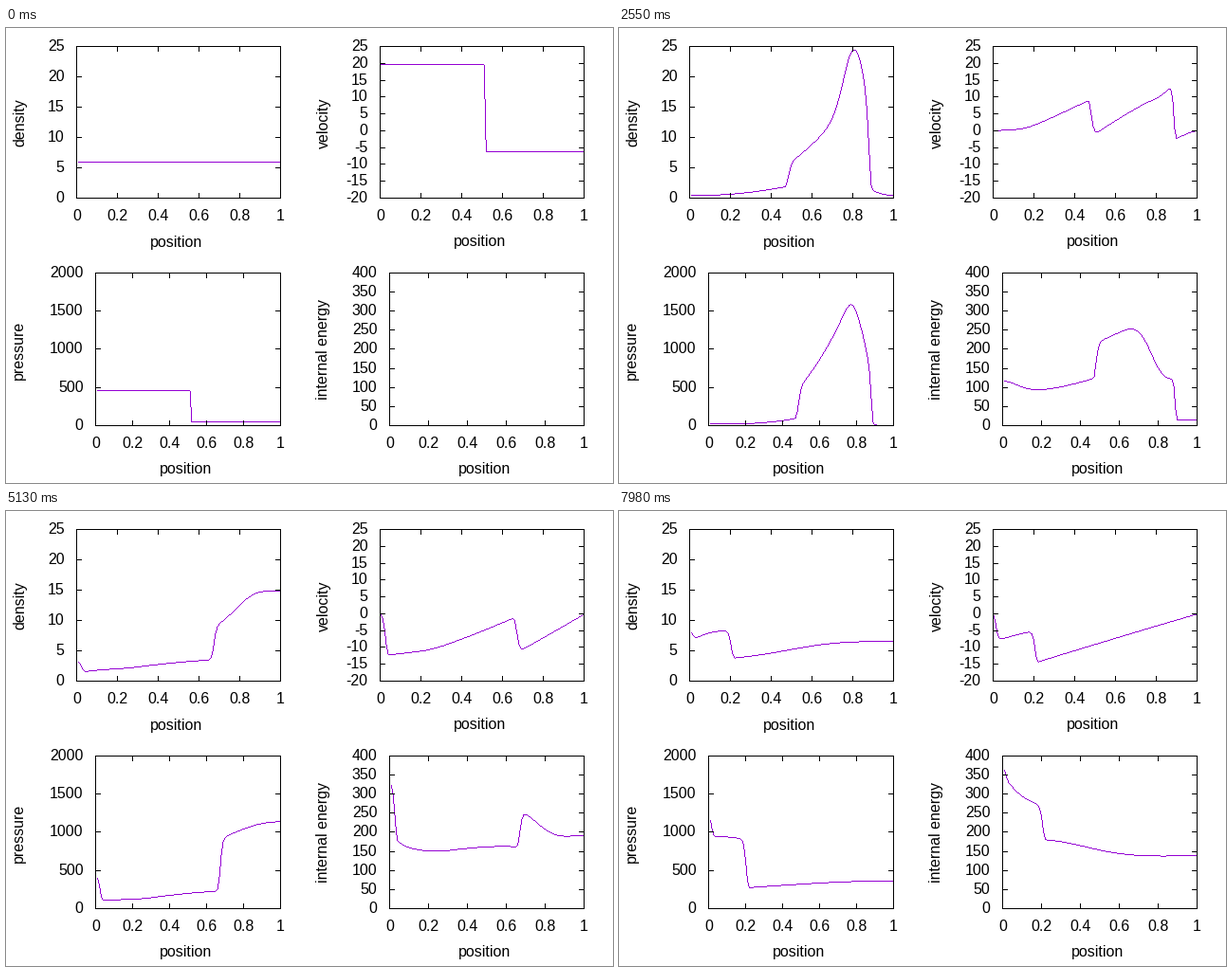
Write a matplotlib script that moves like this. It is 640x480 px and loops after 8 s.

```python
import numpy as np
import matplotlib.pyplot as plt
from matplotlib.animation import FuncAnimation
from matplotlib.collections import LineCollection
from matplotlib.patches import Rectangle

W, H = 640, 480
PX = 0.72                 # one pixel in points at 100 dpi
LOOP, TICK = 8000, 25     # ms
HOLD = 30                 # ms each state stays on screen
STATES = 267

# Gas dynamics: colliding streams between two solid walls
N = 100
DX = 1 / N
GAMMA = 1.4
CFL = 0.9
MIRROR = np.array([[1], [-1], [1]])


def primitive(cons):
    rho, mom, energy = cons
    u = mom / rho
    p = np.maximum((GAMMA - 1) * (energy - mom * u / 2), 1e-6)
    return rho, u, p


def advance(cons):
    """One first-order HLL step with reflecting ends."""
    full = np.hstack((cons[:, :1] * MIRROR, cons, cons[:, -1:] * MIRROR))
    rho, u, p = primitive(full)
    c = np.sqrt(GAMMA * p / rho)
    f = np.array([rho * u, rho * u * u + p, (full[2] + p) * u])
    slow, fast = u - c, u + c
    lo = np.minimum(np.minimum(slow[:-1], slow[1:]), 0)
    hi = np.maximum(np.maximum(fast[:-1], fast[1:]), 0)
    flux = (hi * f[:, :-1] - lo * f[:, 1:] + lo * hi * np.diff(full)) / (hi - lo)
    dt = CFL * DX / np.max(abs(u) + c)
    return cons - dt / DX * np.diff(flux)


def simulate():
    left = np.arange(1, N + 1) <= 51
    rho = np.where(left, 5.99924, 5.99242)
    u = np.where(left, 19.5975, -6.19633)
    p = np.where(left, 460.894, 46.095)
    cons = np.array([rho, rho * u, p / (GAMMA - 1) + rho * u * u / 2])
    states = [(rho, np.append(u[0], u), p, np.zeros(N))]
    for _ in range(STATES - 1):
        cons = advance(cons)
        rho, u, p = primitive(cons)
        states.append((rho, np.append(0, u), p, p / rho / (GAMMA - 1)))
    return states


# Name, left, right, top, bottom, low, high, y step, baselines of both titles
PANELS = [
    ("density", 74, 289, 19, 179, 0, 25, 5, 231, 19),
    ("velocity", 394, 609, 19, 179, -20, 25, 5, 230, 339),
    ("pressure", 94, 289, 258, 419, 0, 2000, 500, 470, 17),
    ("internal energy", 404, 609, 258, 419, 0, 400, 50, 470, 339),
]

plt.rcParams["font.family"] = "Liberation Sans"
fig = plt.figure(figsize=(W / 100, H / 100), dpi=100, facecolor="white")
ax = fig.add_axes([0, 0, 1, 1])
ax.set_xlim(0, W)
ax.set_ylim(0, H)
ax.axis("off")


def pix(x, y):
    """Centre of the pixel in column x, row y counted from the top."""
    return round(x) + 0.5, H - 0.5 - round(y)


def label(x, y, text, ha="center", rotation=0):
    ax.text(x + 0.5, H - y, text, ha=ha, va="baseline", rotation=rotation,
            rotation_mode="anchor", fontsize=16 * PX, color="black")


def add_lines(color, cap, zorder):
    group = LineCollection([], colors=color, linewidths=PX, capstyle=cap,
                           zorder=zorder)
    group.set_snap(False)
    ax.add_collection(group, autolim=False)
    return group


def add_panel(name, x0, x1, top, bottom, low, high, step, xbase, ybase):
    segs = [[pix(x0, top), pix(x1, top)], [pix(x0, bottom), pix(x1, bottom)],
            [pix(x0, top), pix(x0, bottom)], [pix(x1, top), pix(x1, bottom)]]
    for i in range(6):
        x = x0 + (x1 - x0) * i / 5
        segs.append([pix(x, bottom), pix(x, bottom - 5)])
        segs.append([pix(x, top), pix(x, top + 5)])
        label(x, bottom + 24, f"{i / 5:g}")
    for val in range(low, high + 1, step):
        y = bottom - (bottom - top) * (val - low) / (high - low)
        segs.append([pix(x0, y), pix(x0 + 5, y)])
        segs.append([pix(x1, y), pix(x1 - 5, y)])
        label(x0 - 13, round(y) + 5, str(val), ha="right")
    label((x0 + x1) / 2 - 2, xbase, "position")
    label(ybase, (top + bottom) / 2 + 1, name, rotation=90)
    add_lines("black", "projecting", 3).set_segments(segs)

    curve = add_lines("#9400d3", "butt", 2)
    curve.set_clip_path(Rectangle((x0, H - 1 - bottom), x1 - x0 + 1,
                                  bottom - top + 1, transform=ax.transData))
    return curve


def pixel_runs(x, y):
    """Crisp one-pixel curve: the vertical run of pixels in each column."""
    cols = np.arange(round(x[0]), round(x[-1]) + 1)
    a, mid, b = (np.interp(cols + d, x, y) for d in (-0.5, 0, 0.5))
    mid = np.round(mid)
    lo = np.minimum(np.ceil(np.minimum(a, b)), mid)
    hi = np.maximum(np.floor(np.maximum(a, b)), mid)
    ends = np.stack((H - lo, H - 1 - hi), axis=1)
    return np.stack((np.stack((cols + 0.5, cols + 0.5), axis=1), ends), axis=2)


curves = [add_panel(*p) for p in PANELS]
states = simulate()


def draw(k):
    i = min((k * TICK + TICK - 1) // HOLD, STATES - 1)
    for curve, data, panel in zip(curves, states[i], PANELS):
        x0, x1, top, bottom, low, high = panel[1:7]
        x = np.arange(N + 1 - len(data), N + 1) / N
        y = (data - low) / (high - low)
        curve.set_segments(pixel_runs(x0 + (x1 - x0) * x,
                                      bottom - (bottom - top) * y))
    return curves


anim = FuncAnimation(fig, draw, frames=LOOP // TICK, interval=TICK,
                     init_func=lambda: draw(0), repeat=True, repeat_delay=0)
plt.show()
```
